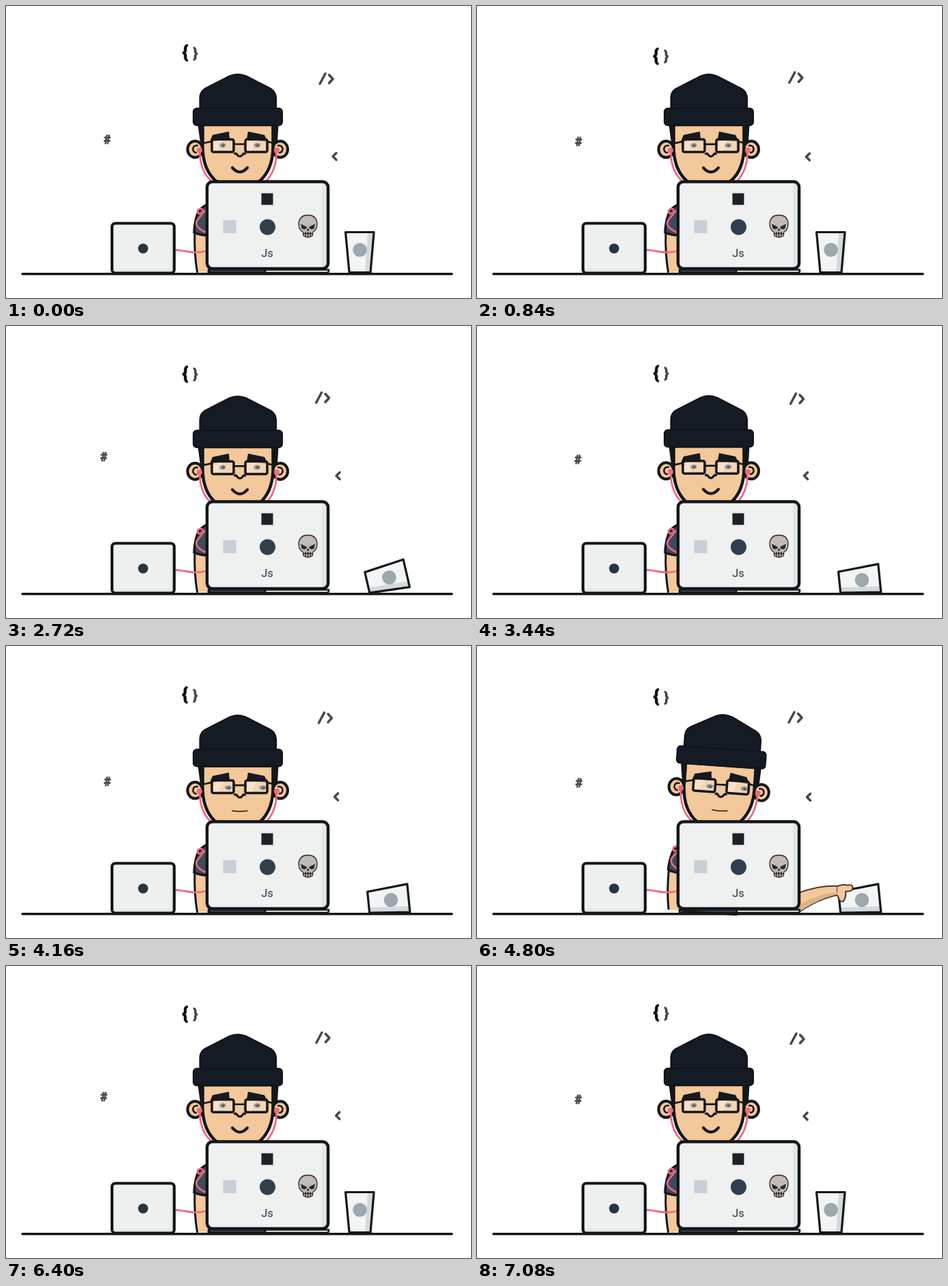
An HTML page that plays this animation: 680x428 px, repeating every 7.12 s.

```html
<!DOCTYPE html>
<html lang="en">
<head>
<meta charset="utf-8">
<title>Coder at the desk</title>
<style>
  html, body { margin: 0; width: 100%; height: 100%; overflow: hidden; background: #fff; }
  svg { display: block; width: 100vw; height: 100vh; }
  .line { fill: none; stroke: #14171a; stroke-linecap: round; stroke-linejoin: round; }
  .ink { stroke: #14171a; stroke-linejoin: round; }
  .wire { fill: none; stroke: #f4687a; stroke-width: 2.8; stroke-linecap: round; }
  .code { fill: none; stroke: #46474a; stroke-width: 3.5; stroke-linecap: round; stroke-linejoin: round; }
  text { font-family: Roboto, Arial, sans-serif; text-anchor: middle; stroke-linejoin: round; }
</style>
</head>
<body>
<svg viewBox="0 0 680 428">
  <defs>
    <clipPath id="aboveDesk"><path d="M0 0H680V391H0z"/></clipPath>
  </defs>

  <!-- floating code -->
  <g id="braces" font-weight="700">
    <text x="-7" y="7.2" font-size="25" fill="#111" stroke="#111" stroke-width="1.2">{</text>
    <text x="8" y="5.6" font-size="19.5" fill="#46474a" stroke="#46474a" stroke-width="1.2">}</text>
  </g>
  <g id="tag" class="code"><path d="M-9.5 7.5L-1.5 -7.5M4 -5.5L9.5 .5L4 6.5"/></g>
  <g id="hash"><text y="6.2" font-size="17.5" font-weight="700" fill="#46474a" stroke="#46474a" stroke-width=".9">#</text></g>
  <g id="less" class="code"><path d="M2.5 -5L-2.5 0L2.5 5"/></g>

  <path class="line" stroke-width="3.4" d="M24 392.700H652"/>

  <!-- torso and left arm -->
  <g id="body">
    <path class="ink" fill="#3a4d5b" stroke-width="3" d="M297 300H379V391H297z"/>
    <path fill="#f3c89a" d="M276 330Q275 362 279.500 390.500H296V330z"/>
    <path class="line" stroke-width="3" d="M276 332Q275 362 279.500 389.500"/>
    <path class="ink" fill="#3a4d5b" stroke-width="3.4" d="M312 287Q286 289 279.500 306Q275.500 318 275 332Q285 337 312 337z"/>
    <path class="wire" d="M295 333C283 328 276 322 279 315C283 308 289 306 288 300C287 295 280 297 280 302C281 306 289 304 296 297"/>
  </g>

  <!-- head -->
  <g id="head">
    <g class="ink" fill="#f3c89a" stroke-width="4">
      <ellipse cx="276.5" cy="210" rx="11" ry="12"/>
      <ellipse cx="401" cy="210" rx="11" ry="12"/>
    </g>
    <path class="line" stroke-width="2.500" d="M280 204.500Q273 204 273.500 211Q275 215 278 215M398 204.500Q405 204 404.500 211Q403 215 400 215"/>
    <path class="ink" fill="#f3c89a" stroke-width="4.500" d="M287.500 174V207C288 243 306 266 339 269C372 266 390 243 390.500 207V174z"/>
    <path fill="#14171a" d="M280.500 174H289.500V201L284 200zM388.500 174H398.500L397 199L389 201z"/>
    <path fill="#17191f" d="M302 189L326 184L327 195L298 199zM354 184L378 189L383 199L352 195z"/>
    <g fill="#f6dfc8" fill-opacity=".55">
      <rect x="301" y="195.500" width="32" height="18.500" rx="3"/>
      <rect x="350" y="195.500" width="32" height="18.500" rx="3"/>
    </g>
    <g id="eyes">
      <g fill="#8b9097"><ellipse cx="316.500" cy="204" rx="5" ry="3.200"/><ellipse cx="367" cy="204" rx="5" ry="3.200"/></g>
      <g fill="#5c646d"><circle cx="317.500" cy="204.500" r="2.200"/><circle cx="368" cy="204.500" r="2.200"/></g>
    </g>
    <path fill="#fff" fill-opacity=".3" d="M306 196H318L310 213H302zM355 196H367L359 213H351z"/>
    <g class="line" stroke-width="3.500">
      <rect x="301" y="195.500" width="32" height="18.500" rx="2.500"/>
      <rect x="350" y="195.500" width="32" height="18.500" rx="2.500"/>
      <path stroke-width="2.600" d="M333 202.500H350M289 201L301 198.500M382 198.500L391 201"/>
      <path stroke-width="3.200" d="M334.500 216.500Q336.500 215 338 218Q342 223 346 218Q347.500 215 349.500 216.500"/>
    </g>
    <path id="mouth" class="line"/>
    <g class="wire">
      <path d="M283.500 212C283 233 290 249 304 260M395.500 212C396 233 389 249 377 260"/>
    </g>
    <g fill="#f4687a"><circle cx="283" cy="211.500" r="4"/><circle cx="396" cy="211.500" r="4"/></g>
    <g fill="#151b25" stroke="#0f1319" stroke-width="2" stroke-linejoin="round">
      <path d="M283.500 153V134Q284 125 291 121L327 102.500Q339 97.500 351 102.500L387 121Q394 125 395 134V153z"/>
      <rect x="274" y="150" width="130" height="25" rx="5"/>
    </g>
  </g>

  <!-- cup and reaching arm -->
  <g id="cup">
    <path fill="#f3f5f5" d="M496.500 331.500H538L533 391H502z"/>
    <path fill="#d3dade" d="M529 331.500H538L533 391H525z"/>
    <circle cx="517.500" cy="357.500" r="10.300" fill="#9ba8ae"/>
    <path class="line" stroke-width="3.200" d="M496.500 331.500H538L533 390.500H502z"/>
  </g>
  <g clip-path="url(#aboveDesk)" fill="#f3c89a" stroke="#4a3a2d" stroke-width="2" stroke-linejoin="round">
    <path id="arm"/>
    <path id="shade" fill="#dcb488" stroke="none"/>
    <path id="hand" d="M0 -6Q7 -9 15 -7.500Q22 -9 22.500 -4Q22 2 15 1.500L12 2Q13 10 9 16Q4 18 2 12L0 7"/>
  </g>

  <!-- tablet -->
  <path class="wire" d="M247 357.500C258 357 272 365 295 358.500"/>
  <rect x="155" y="318.500" width="91" height="73" rx="5" fill="#eef0f0"/>
  <path fill="#dfe5e7" d="M240 320H245V390H240zM157 385H244V390H157z" opacity=".6"/>
  <rect class="line" x="155" y="318.500" width="91" height="73" rx="5" stroke-width="4.200"/>
  <circle cx="200.500" cy="355.500" r="7.300" fill="#263540"/>

  <!-- laptop -->
  <path fill="#e8ecee" d="M381 386H471V391H381z"/>
  <path class="line" stroke-width="2.400" d="M296 386.500H472V389Q471 391 467 391H296z"/>
  <rect x="294" y="257.500" width="177" height="127.500" rx="8" fill="#eef1f0"/>
  <path fill="#e0e6e8" d="M462 259H466Q470 260 470 266V378Q469 383 462 383z"/>
  <rect class="line" x="294" y="257.500" width="177" height="127.500" rx="8" stroke-width="4.400"/>
  <rect x="373.500" y="274.500" width="17" height="17" fill="#1d2226"/>
  <rect x="317.500" y="314" width="19" height="19" fill="#c6d0d6"/>
  <circle cx="382.500" cy="324" r="11.500" fill="#2f404c"/>
  <text x="382" y="367.500" font-size="16.500" font-weight="500" fill="#465866">Js</text>
  <g stroke="#2a2727" stroke-width="1.300" stroke-linejoin="round">
    <path fill="#c1bab7" d="M434 331Q428 328 428 319Q429 306.500 441.500 306.500Q454 306.500 455 319Q455 328 449 331L448 337Q441.500 341 435 337z"/>
    <path fill="#2a2727" stroke-width=".8" d="M431.500 320L439.500 324Q438.500 328.500 433 326zM451.500 320L443.500 324Q444.500 328.500 450 326zM441.500 326L443 329H440z"/>
    <path fill="none" d="M435 333.500H448M438 331V338M441.500 331V339M445 331V338"/>
  </g>
</svg>

<script>
const LOOP = 7120, STEP = 40, DRIFT = LOOP / 2, BEATS = 9;
const el = id => document.getElementById(id);
const lerp = (a, b, k) => a + (b - a) * k;
const smooth = k => k * k * (3 - 2 * k);
const fall = k => k * k;

// Value at time t along rows of [time, value, easing]
function track(t, rows) {
  if (t <= rows[0][0]) return rows[0][1];
  for (let i = 1; i < rows.length; i++) {
    const [t0, a] = rows[i - 1], [t1, b, ease = smooth] = rows[i];
    if (t <= t1) return lerp(a, b, ease((t - t0) / (t1 - t0)));
  }
  return rows[rows.length - 1][1];
}

const driftTimes = [0, 1240, 1720, 2160, 2720, 3440];
const drifts = {
  braces: { x: [269, 269, 272, 270, 269, 269], y: [70, 76, 73.5, 71, 71.5, 70.5] },
  tag: { x: [468.5, 465.5, 466.5, 466, 463, 468], y: [106.5, 104.5, 108, 107.5, 105, 106.5] },
  hash: { x: [148, 149, 152.5, 150.5, 143, 147.5], y: [196, 200.5, 200, 198, 192, 195.5] },
  less: { x: [480.5, 485, 482.5, 482.5, 485.5, 481], y: [220.5, 221.5, 223.5, 222.5, 219.5, 219.5] }
};

// Smooth closed curve through values at driftTimes
function drift(t, v) {
  const n = v.length, u = t % DRIFT;
  const time = i => driftTimes[(i + n) % n] + Math.floor(i / n) * DRIFT;
  const val = i => v[(i + n) % n];
  const slope = i => (val(i + 1) - val(i - 1)) / (time(i + 1) - time(i - 1));
  let i = n - 1;
  while (driftTimes[i] > u) i--;
  const d = time(i + 1) - time(i), k = (u - time(i)) / d, s = smooth(k);
  return lerp(val(i), val(i + 1), s)
    + d * k * (1 - k) * ((1 - k) * slope(i) - k * slope(i + 1));
}

const flat = 84.3;
const cupTilt = [[2200, 0], [2560, flat, fall], [2720, 77], [2840, flat, fall], [4880, flat], [5280, 0]];
const lean = [[4160, 0], [4640, 1], [5120, 1], [5600, 0]];
const reach = [[4240, 0], [4680, 1], [5320, 1], [5640, 0]];
const gaze = [[3680, 0], [3960, 1], [5280, 1], [5560, 0]];
const mood = [[3680, 1], [4000, 0], [5360, 0], [5720, 0.4], [6160, 1]];

const move = (id, value) => el(id).setAttribute('transform', value);
const shape = (id, d) => el(id).setAttribute('d', d);

function drawArm(t, tilt) {
  // The wrist follows its grip on the turning cup
  const turn = (tilt - flat) * Math.PI / 180, c = Math.cos(turn), s = Math.sin(turn);
  const gripX = 520 + 7 * c + 33 * s, gripY = 391 + 7 * s - 33 * c;
  const k = track(t, reach);
  const x = lerp(425, gripX, k), y = lerp(372, gripY, k), mid = (450 + x) / 2 + 2;
  const under = `Q${mid} ${y + 14} 450 406`;
  shape('arm', `M450 371Q${mid} ${y - 8} ${x} ${y - 6}L${x} ${y + 7}${under}`);
  shape('shade', `M450 394Q${mid} ${y + 5} ${x} ${y + 3}L${x} ${y + 6}${under}z`);
  move('hand', `translate(${x} ${y})`);
}

function draw(t) {
  for (const id in drifts)
    move(id, `translate(${drift(t, drifts[id].x)} ${drift(t, drifts[id].y)})`);

  const bob = 1.5 * (1 - Math.cos(2 * Math.PI * BEATS * t / LOOP));
  const tip = track(t, lean), look = track(t, gaze), m = track(t, mood);
  move('head', `rotate(${4 * tip} 339 425) translate(0 ${bob * (1 - tip * 0.6)})`);
  move('body', `rotate(${4 * tip} 339 395)`);
  move('eyes', `translate(${8.5 * look} ${2 * look})`);

  const side = 240 - 3 * m;
  shape('mouth', `M331 ${side}Q342 ${242 + 7.5 * m} 353 ${side}`);
  el('mouth').setAttribute('stroke-width', 1.5 + 2.7 * m * m);

  const tilt = track(t, cupTilt);
  move('cup', `rotate(${tilt} 532 390)`);
  drawArm(t, tilt);
}

const start = performance.now();
function tick() {
  const t = (performance.now() - start) % LOOP;
  draw(Math.floor(t / STEP) * STEP);
  requestAnimationFrame(tick);
}
tick();
</script>
</body>
</html>
```
